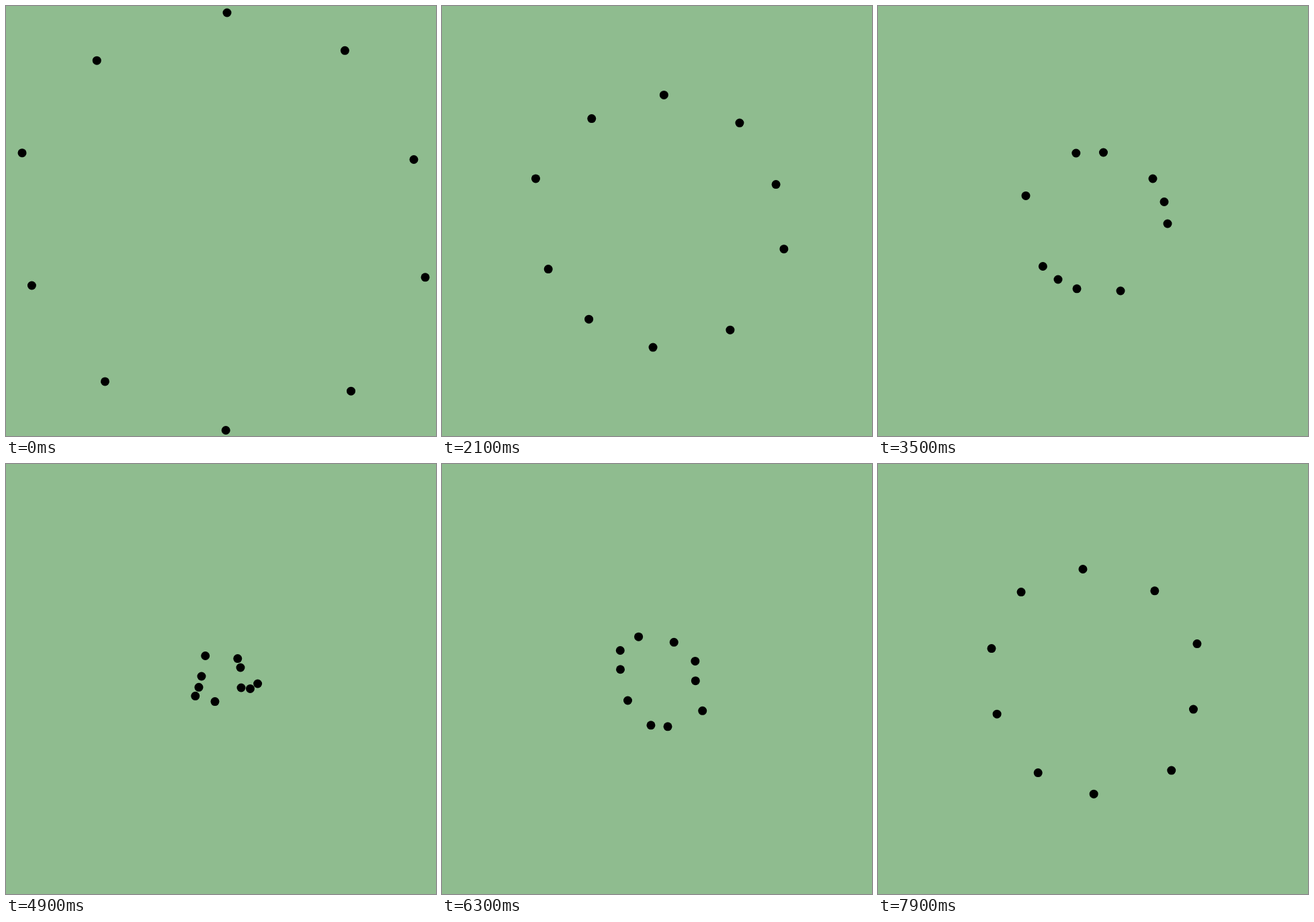
Recreate the animation shown at these times as an HTML page. Size 640 by 640 pixels, loop 8000 ms.

```html
<!DOCTYPE html>
<html lang="en">
<head>
<meta charset="utf-8">
<title>Crossing dots</title>
<style>
  html, body { margin: 0; width: 100%; height: 100%; overflow: hidden; background: #8fbc8f; }
  svg { display: block; width: 100%; height: 100%; }
</style>
</head>
<body>
<svg id="stage" viewBox="0 0 640 640"></svg>
<script>
const LOOP = 8000, TICK = 100, CENTER = 320;
const APPROACH = 67.4, EXIT_SPEED = 3.17, TWIST = 1.9 * Math.PI / 180;
const REACT = 23, GATE = 69, TURN = 97; // steps at which each phase ends

// Key points of each dot: its place on the ring, where the crowd has pushed it, where it is free again.
const DOTS = [
  { start: [329, 10], gate: [335.5, 218], turn: [349, 303] },
  { start: [504.4, 66.3], gate: [409, 257], turn: [374.6, 327] },
  { start: [607, 228.5], gate: [426, 291.5], turn: [363.5, 334.4] },
  { start: [624, 403.8], gate: [431, 324], turn: [350, 333] },
  { start: [513.5, 573.2], gate: [361, 424], turn: [311, 353.6] },
  { start: [327.2, 631.5], gate: [296, 420.8], turn: [281.8, 345.3] },
  { start: [147.4, 558.9], gate: [268, 407], turn: [287, 332.3] },
  { start: [38.4, 416], gate: [245.4, 387.5], turn: [291, 316] },
  { start: [24, 218.7], gate: [220, 282.4], turn: [296.7, 285.5] },
  { start: [135.2, 81.2], gate: [294.8, 219], turn: [344.8, 289.6] }
];

const mix = (a, b, u) => a.map((v, i) => v + (b[i] - v) * u);

function toward(from, to, distance) {
  return mix(from, to, distance / Math.hypot(to[0] - from[0], to[1] - from[1]));
}

// The goal lies across the ring, turned slightly clockwise.
function goalOf([x, y]) {
  const angle = Math.atan2(y - CENTER, x - CENTER) + Math.PI + TWIST;
  const radius = Math.hypot(x - CENTER, y - CENTER);
  return [CENTER + radius * Math.cos(angle), CENTER + radius * Math.sin(angle)];
}

// Head for the center, dodge through the crowd, then go straight to the goal.
function place({ start, gate, turn }, step) {
  const react = toward(start, [CENTER, CENTER], APPROACH);
  if (step < REACT) return mix(start, react, step / REACT);
  if (step < GATE) return mix(react, gate, (step - REACT) / (GATE - REACT));
  if (step < TURN) return mix(gate, turn, (step - GATE) / (TURN - GATE));
  return toward(turn, goalOf(start), (step - TURN) * EXIT_SPEED);
}

const stage = document.getElementById("stage");
const circles = DOTS.map(() => {
  const circle = document.createElementNS("http://www.w3.org/2000/svg", "circle");
  circle.setAttribute("r", 6.5);
  return stage.appendChild(circle);
});

function draw(time) {
  const step = Math.max(0, 2 * Math.floor(time / TICK) - 1);
  circles.forEach((circle, i) => {
    const [x, y] = place(DOTS[i], step);
    circle.setAttribute("cx", x.toFixed(2));
    circle.setAttribute("cy", y.toFixed(2));
  });
}

const begin = performance.now();
function frame() {
  draw((performance.now() - begin) % LOOP);
  requestAnimationFrame(frame);
}
frame();
</script>
</body>
</html>
```
